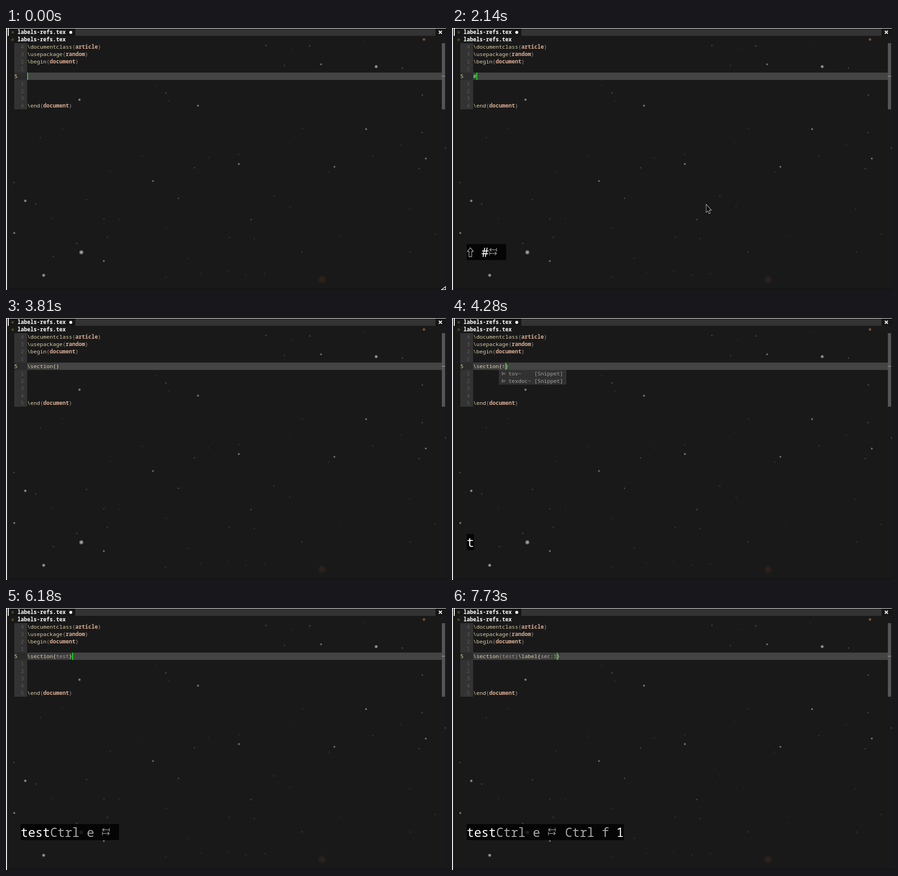
Recreate the animation shown at these times as an HTML page with a canvas. Size 958 by 570 pixels, loop 8000 ms.

```html
<!DOCTYPE html>
<html lang="en">
<head>
<meta charset="utf-8">
<title>LaTeX editing</title>
<style>
  html, body { margin: 0; width: 100%; height: 100%; overflow: hidden; background: #191919; }
  canvas { display: block; width: 958px; height: 570px; }
</style>
</head>
<body>
<canvas id="stage" width="958" height="570"></canvas>
<script>
const W = 958, H = 570, LOOP = 8000;
const TICK = 118.95;  // screen refresh in ms
const BLINK = 4.2;    // caret half period in ticks
const ctx = document.getElementById('stage').getContext('2d');

const CELL = 7, ROW = 16, LEFT = 46, TOP = 33, KEY = 16;
const FACE = '"Noto Sans Mono", "DejaVu Sans Mono", monospace';
const SMALL = `11.667px ${FACE}`, BOLD = `bold ${SMALL}`, BIG = `26.667px ${FACE}`;
const C = {
  back: '#191919', bar: '#333333', line: '#444444', cells: '#3d3d3d', gutter: '#333333',
  cmd: '#ddd0a8', brace: '#8f8f8a', bright: '#e6e2d0', arg: '#dcae92',
  title: '#b0958c', label: '#adaba6', number: '#5a5a5a', caret: '#00ee00', key: '#a8a8a8'
};

// Each step: tick, pressed keys to show, text to insert, caret shift.
// Keys: ^ shift, > tab, ~ toggles modifier colour, ! clears. In text, # gives way to a snippet.
const script = [
  [2.8, '', ''], [10, '', ''], [11, '^ '], [12, '#'], [13, '', '#'],
  [18, '> ', ''], [18.8, '', '\\section{}', -1], [29, '!'],
  [34, 't', 't'], [37, 'e', 'e'], [38, 'st', 'st'], [39, '~Ctrl '], [40.9, 'e ', ''],
  [46.8, '', '', 1], [48, '> '], [52, '', ''], [53, 'Ctrl '], [54, 'f '],
  [55.8, '', '\\label{sec:}', -1], [63, '~1', '1']
];

function stateAt(tick) {
  let keys = '', line = '', col = 0, last = tick;
  for (const [at, shown, insert, shift = 0] of script) {
    if (at > tick) break;
    keys = shown === '!' ? '' : keys + shown;
    if (insert === undefined) continue;
    last = at;
    if (insert[0] === '\\' && line === '#') {
      line = '';
      col = 0;
    }
    line = line.slice(0, col) + insert + line.slice(col);
    col += insert.length + shift;
  }
  return { keys, line, col, lit: Math.floor((tick - last) / BLINK) % 2 === 0 };
}

function rect(x, y, w, h, color) {
  ctx.fillStyle = color;
  ctx.fillRect(x, y, w, h);
}

function text(s, x, y, color, font = SMALL) {
  ctx.font = font;
  ctx.fillStyle = color;
  ctx.fillText(s, x, y);
}

function path(points, color, width, close) {
  ctx.beginPath();
  points.forEach(([x, y], i) => i ? ctx.lineTo(x, y) : ctx.moveTo(x, y));
  if (close) ctx.closePath();
  ctx.strokeStyle = color;
  ctx.lineWidth = width;
  ctx.stroke();
}

function glow(x, y, r, rgb, alpha) {
  const g = ctx.createRadialGradient(x, y, 0, x, y, r);
  g.addColorStop(0, `rgba(${rgb},${alpha})`);
  g.addColorStop(0.5, `rgba(${rgb},${alpha * 0.8})`);
  g.addColorStop(1, `rgba(${rgb},0)`);
  rect(x - r, y - r, 2 * r, 2 * r, g);
}

function seeded(seed) {
  return () => (seed = seed * 16807 % 2147483647) / 2147483647;
}

// The brightest stars: x, y, radius
const bright = [
  [164, 488, 5.4], [806, 84, 4], [82, 538, 4], [42, 376, 3.4], [160, 156, 3.1],
  [418, 169, 2.8], [507, 296, 2.7], [784, 220, 2.7], [18, 446, 2.8], [914, 284, 2.6],
  [686, 79, 2.6], [320, 333, 2.5], [213, 507, 2.6], [715, 302, 2.6]
];

function sky() {
  rect(0, 0, W, H, C.back);
  for (const [x, y, r] of bright) glow(x, y, r, '185,185,185', Math.min(0.9, 0.25 + r * 0.16));
  const random = seeded(71);
  for (let i = 0; i < 55; i++) {
    const x = random() * W, y = 20 + random() * 530;
    glow(x, y, 2, '160,160,160', 0.12 + 0.4 * random() ** 2);
  }
  glow(910, 25, 3.6, '190,115,70', 0.75);
  glow(688, 547, 10, '90,55,35', 0.32);
  rect(0, 566, W, 4, '#151515');
}

function header() {
  rect(2, 1, W - 2, 16, '#161616');
  rect(151, 1, 784, 16, C.bar);
  rect(4, 1, 2, 16, '#ffffff');
  for (const y of [0, 16]) {
    rect(12, y + 7, 5, 5, '#4a431d');
    text('labels-refs.tex', 25, y + 13, '#ffffff', BOLD);
  }
  ctx.beginPath();
  ctx.arc(141, 9.5, 3.2, 0, 7);
  ctx.fill();
  path([[942.5, 6], [949, 12.5]], '#ffffff', 2.2);
  path([[949, 6], [942.5, 12.5]], '#ffffff', 2.2);
}

function baseline(row) {
  return TOP + row * ROW + 12;
}

function command(row, name, arg) {
  const y = baseline(row), x = LEFT + (name.length + 1) * CELL;
  text('\\' + name, LEFT, y, C.cmd);
  text('{', x, y, C.brace);
  text(arg, x + CELL, y, C.arg, BOLD);
  text('}', x + CELL * (arg.length + 1), y, C.brace);
}

// The line being typed; only its last pair of braces is lit.
function source(line) {
  const lastOpen = line.lastIndexOf('{');
  let col = 0, name = '';
  for (const part of line.match(/\\[a-z]+|[{}]|[^\\{}]+/g) || []) {
    let color = name === '\\label' ? C.label : name ? C.title : '#cccccc';
    if (part[0] === '\\') {
      name = part;
      color = C.cmd;
    } else if (part === '{' || part === '}') {
      color = col >= lastOpen ? C.bright : C.brace;
    }
    text(part, LEFT + col * CELL, baseline(4), color);
    col += part.length;
  }
}

function editor({ line, col, lit }) {
  const rows = line.length > 1 ? 10 : 9;
  rect(18, TOP, 28, rows * ROW, C.gutter);
  rect(18, 97, 28, ROW, '#2b2b2b');
  rect(LEFT, 97, 903, ROW, C.line);
  rect(LEFT, 97, line.length * CELL, ROW, C.cells);
  rect(949, TOP, 7, rows * ROW, '#555555');
  rect(949, 104, 7, 2, '#858585');

  for (let i = 0; i < rows; i++) {
    if (i === 4) text('5', 18, baseline(i), '#d8d8a0');
    else text(Math.abs(i - 4), 32, baseline(i), C.number);
  }
  command(0, 'documentclass', 'article');
  command(1, 'usepackage', 'random');
  command(2, 'begin', 'document');
  command(rows - 1, 'end', 'document');
  source(line);
  if (lit) rect(LEFT + col * CELL, 97, 2, ROW, C.caret);
}

function scissors(x, y) {
  for (const d of [-2, 2]) {
    path([[x - 2, y + d], [x + 4, y - d]], '#999999', 0.9);
    ctx.beginPath();
    ctx.arc(x - 2.5, y + d, 1, 0, 7);
    ctx.stroke();
  }
}

function popup() {
  rect(102, 113, 147, 32, '#313131');
  ['tov~', 'texdoc~'].forEach((word, i) => {
    scissors(112, 121 + i * ROW);
    text(word.padEnd(8) + '[Snippet]', 123, baseline(5 + i), '#a0a0a0');
  });
}

function shiftKey(x) {
  const half = [[0, 478], [6.5, 486], [3, 486], [3, 497.5]];
  const left = half.slice(1).reverse().map(([d, y]) => [-d, y]);
  path([...half, ...left].map(([d, y]) => [x + 8 + d, y]), C.key, 1.3, true);
}

function tabKey(x) {
  const arrow = (y, tail, tip) => {
    const back = Math.sign(tail - tip) * 4;
    path([[tail, y], [tip, y]], C.key, 1.2);
    path([[tail, y - 4], [tail, y + 4]], C.key, 1.2);
    path([[tip + back, y - 3.5], [tip, y], [tip + back, y + 3.5]], C.key, 1.2);
  };
  arrow(482.5, x + 17, x + 2);
  arrow(490.5, x + 2, x + 17);
}

function overlay(keys) {
  if (!keys) return;
  const size = ch => ch === '~' ? 0 : ch === '>' ? 22 : KEY;
  rect(32, 470, [...keys].reduce((sum, ch) => sum + size(ch), 0), 35, 'rgba(0,0,0,0.8)');
  let x = 32, color = '#ffffff';
  for (const ch of keys) {
    if (ch === '^') shiftKey(x);
    else if (ch === '>') tabKey(x);
    else if (ch === '~') color = color === C.key ? '#ffffff' : C.key;
    else text(ch, x, 498, color, BIG);
    x += size(ch);
  }
}

// Starts as a resize corner, eases to rest, and hides once typing goes on.
function pointer(tick) {
  if (tick >= 29) return;
  if (tick < 2) {
    path([[948, 569.5], [957, 562.5], [957, 569.5]], '#ffffff', 1.3, true);
    return;
  }
  const left = (1 - Math.min(tick - 1, 3) / 3) ** 3;
  const x = 553 + 395 * left, y = 384 + 178 * left;
  const shape = [[0.5, 0.5], [0.5, 16.5], [4, 13.2], [6.6, 19.3], [9, 18.2], [6.5, 12.3], [11.3, 12]];
  path(shape.map(([a, b]) => [x + a, y + b]), '#ffffff', 1.3, true);
  ctx.fillStyle = '#111111';
  ctx.fill();
}

function draw(t) {
  const tick = Math.floor((t + 8) / TICK), state = stateAt(tick);
  sky();
  header();
  editor(state);
  if (tick === 36) popup();
  overlay(state.keys);
  rect(0, 0, W, 1, '#ffffff');
  rect(0, 0, 2, H, '#ffffff');
  pointer(tick);
}

const began = performance.now();
function frame() {
  draw((performance.now() - began) % LOOP);
  requestAnimationFrame(frame);
}
frame();
</script>
</body>
</html>
```
